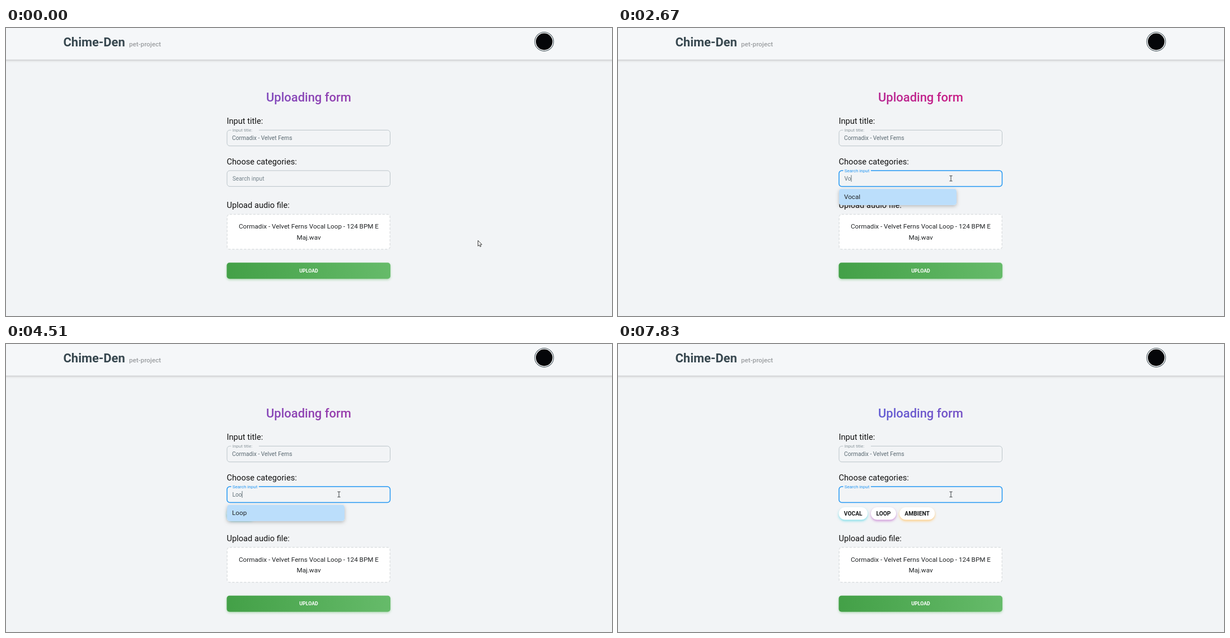
These frames come from a looping animation (1083 by 517 pixels, 8000 ms). An HTML page with a canvas:

```html
<!DOCTYPE html>
<html lang="en">
<head>
<meta charset="utf-8">
<title>Uploading form</title>
<style>
  html, body { margin: 0; width: 100%; height: 100%; overflow: hidden; background: #f2f4f6; }
  canvas { display: block; width: 1083px; height: 517px; }
</style>
</head>
<body>
<canvas id="stage"></canvas>
<script>
const W = 1083, H = 517, LOOP = 8000;
const PAGE = '#f2f4f6', BLUE = '#2196f3';
const LEFT = 394.5, WIDTH = 292.5, ROW = 29.2;
const ROOT = 0.7315; // page zoom: CSS px to stage px
const TITLE = 'Cormadix - Velvet Ferns';

const canvas = document.getElementById('stage');
const ctx = canvas.getContext('2d');
const dpr = window.devicePixelRatio || 1;
canvas.width = W * dpr;
canvas.height = H * dpr;

const CHIPS = [
  { at: 3240, label: 'VOCAL', x: 394.5, w: 51.5, glow: '#80deea' },
  { at: 4720, label: 'LOOP', x: 452, w: 45, glow: '#ce93d8' },
  { at: 7280, label: 'AMBIENT', x: 503, w: 63.2, glow: '#ffcc80' }
];

// Each entry: time, text in the search field, suggestions
const TYPING = [
  [1000, '', []],
  [1970, 'V', ['Vocal', 'Live', 'Wave', 'Reverb', 'Vibe']],
  [2380, 'Vo', ['Vocal']],
  [3240, '', []],
  [3840, 'L', ['Loop', 'Lofi', 'Melody', 'Sample', 'Chill']],
  [4040, 'Lo', ['Loop', 'Lofi']],
  [4250, 'Loo', ['Loop']],
  [4720, '', []],
  [5820, 'A', ['Ambient', 'Sample', 'Bass', 'Guitar', 'Piano']],
  [6170, 'Am', ['Ambient', 'Sample']],
  [7280, '', []]
];

const POINTER = [[70, 843.5, 381.5], [250, 812, 378], [560, 640, 308], [680, 610, 293], [810, 595, 270]];

const clamp = (v, a = 0, b = 1) => Math.min(b, Math.max(a, v));
const mix = (a, b, k) => a + (b - a) * k;
const smooth = k => k * k * (3 - 2 * k);

// CSS "ease": cubic-bezier(.25, .1, .25, 1)
function ease(x) {
  let lo = 0, hi = 1, u = 0.5;
  const bez = (a, b) => 3 * (1 - u) ** 2 * u * a + 3 * (1 - u) * u * u * b + u ** 3;
  for (let i = 0; i < 20; i++) {
    u = (lo + hi) / 2;
    if (bez(0.25, 0.25) < x) lo = u; else hi = u;
  }
  return bez(0.1, 1);
}

function text(str, x, y, px, color, weight = 400, align = 'left') {
  ctx.font = `${weight} ${px * ROOT}px Roboto, sans-serif`;
  ctx.textAlign = align;
  ctx.fillStyle = color;
  ctx.fillText(str, x, y);
  return ctx.measureText(str).width;
}

function box(x, y, w, h, r) {
  ctx.beginPath();
  ctx.roundRect(x, y, w, h, r);
}

function shadowFill(color, dy, blur, fill) {
  ctx.save();
  ctx.shadowColor = color;
  ctx.shadowOffsetY = dy * dpr;
  ctx.shadowBlur = blur * dpr;
  ctx.fillStyle = fill;
  ctx.fill();
  ctx.restore();
}

function header() {
  ctx.beginPath();
  ctx.rect(-10, -10, W + 20, 66.7);
  shadowFill('rgba(0,0,0,.22)', 1.5, 4, '#f5f7f9');
  text('Chime-Den', 102.5, 32.7, 30, '#37474f', 700);
  text('pet-project', 220, 32.7, 16, '#9b9ea1', 500);

  const disc = (r, color) => {
    ctx.beginPath();
    ctx.arc(961.8, 24.5, r, 0, 7);
    ctx.fillStyle = color;
    ctx.fill();
  };
  disc(17.4, '#37474f');
  disc(16.4, '#fff');
  disc(14.9, '#050609');
}

function heading(t) {
  const half = 4250, turn = 3190, span = 6, w = 152;
  const phase = (t - turn) / half, k = Math.floor(phase);
  const e = ease(phase - k);
  const pos = k % 2 ? e : 1 - e;
  const x0 = 464.7 - pos * (span - 1) * w;
  const g = ctx.createLinearGradient(x0, 0, x0 + span * w, 0);
  g.addColorStop(0, 'rgb(92,98,218)');
  g.addColorStop(1, 'rgb(202,28,132)');
  text('Uploading form', 540.9, 132, 30, g, 500, 'center');
}

// float: 0 = label rests inside as placeholder, 1 = label sits in the border
function field(y, label, float, focus) {
  ctx.lineWidth = mix(0.9, 1.5, focus);
  ctx.strokeStyle = focus > 0.3 ? BLUE : '#b5bfc5';
  box(LEFT + 0.5, y + 0.5, WIDTH - 1, 28.4, 5);
  ctx.stroke();
  const px = mix(14, 11, float);
  const color = focus > 0.3 ? BLUE : float ? '#8b979d' : '#73828a';
  if (float > 0.6) {
    ctx.fillStyle = PAGE;
    ctx.fillRect(402.5, y - 1, label.length * 0.7 + 41, 3.2);
  }
  text(label, 404.7, mix(y + 18, y + 3, float), px, color);
}

function search(t, state) {
  const k = smooth(clamp((t - 880) / 200));
  field(255.5, 'Search input', k, k);
  if (!state) return;
  const w = text(state[1], 404.5, 273.8, 14, '#607078');
  if (Math.floor((t - state[0]) / 545) % 2 === 0) {
    ctx.fillStyle = '#55636a';
    ctx.fillRect(404.4 + w, 264, 0.9, 12);
  }
}

function chip(c) {
  box(c.x, 293, c.w, 22.6, 11.3);
  shadowFill(c.glow, 2.2, 4, '#fff');
  text(c.label, c.x + c.w / 2, 308, 14, '#16191b', 700, 'center');
}

function upload(dy) {
  text('Upload audio file:', LEFT, 323.3 + dy, 20, '#111');
  box(LEFT + 0.7, 334.5 + dy, WIDTH - 1.4, 62.8, 4.5);
  ctx.fillStyle = '#fff';
  ctx.fill();
  ctx.setLineDash([4.2, 2.8]);
  ctx.lineWidth = 1.4;
  ctx.strokeStyle = '#dcdfe1';
  ctx.stroke();
  ctx.setLineDash([]);
  text(TITLE + ' Vocal Loop - 124 BPM E', 541, 360.3 + dy, 16, '#1f2224', 400, 'center');
  text('Maj.wav', 541, 379.8 + dy, 16, '#1f2224', 400, 'center');

  const y = 421.2 + dy;
  const g = ctx.createLinearGradient(LEFT + 132, y + 146, LEFT + 161, y - 117);
  const across = ctx.createLinearGradient(LEFT, y + 29, LEFT + WIDTH, y);
  across.addColorStop(0, '#43a047');
  across.addColorStop(1, '#66bb6a');
  box(LEFT, y, WIDTH, 29, 5);
  shadowFill('rgba(76,175,80,.4)', 1.8, 4, across);
  text('UPLOAD', 541, y + 17.6, 12, '#fff', 700, 'center');
}

function menu(items) {
  if (!items.length) return;
  const y = 288.7, h = Math.min(items.length * ROW, 140.4);
  box(395, y, 210, h, 4.5);
  shadowFill('rgba(0,0,0,.25)', 2, 6, '#fff');
  ctx.save();
  ctx.clip();
  ctx.fillStyle = '#bbdefb';
  ctx.fillRect(395, y, 210, ROW);
  items.forEach((s, i) => text(s, 404, 307.2 + i * ROW, 16, '#212426'));
  ctx.restore();
}

function pointer(t) {
  let i = 0;
  while (i < POINTER.length - 2 && t > POINTER[i + 1][0]) i++;
  const [a, ax, ay] = POINTER[i], [b, bx, by] = POINTER[i + 1];
  const k = clamp((t - a) / (b - a));
  const x = mix(ax, bx, k), y = mix(ay, by, k);
  ctx.save();
  ctx.translate(x, y);
  ctx.beginPath();
  if (y < 285) {
    ctx.moveTo(-2.6, -4.7);
    ctx.lineTo(2.6, -4.7);
    ctx.moveTo(0, -4.7);
    ctx.lineTo(0, 4.7);
    ctx.moveTo(-2.6, 4.7);
    ctx.lineTo(2.6, 4.7);
    ctx.lineWidth = 1;
    ctx.strokeStyle = '#3c4043';
  } else {
    [[0, 0], [0, 10], [2.3, 8], [3.8, 11.2], [5.4, 10.5], [4, 7.4], [7, 7.2]]
      .forEach(p => ctx.lineTo(...p));
    ctx.closePath();
    ctx.fillStyle = '#fff';
    ctx.fill();
    ctx.lineWidth = 0.9;
    ctx.strokeStyle = '#222';
  }
  ctx.stroke();
  ctx.restore();
}

function draw(t) {
  ctx.setTransform(dpr, 0, 0, dpr, 0, 0);
  ctx.fillStyle = PAGE;
  ctx.fillRect(0, 0, W, H);
  const state = TYPING.filter(s => s[0] <= t).pop();
  const chips = CHIPS.filter(c => c.at <= t);

  header();
  heading(t);
  text('Input title:', LEFT, 172, 20, '#111');
  field(182.8, 'Input title:', 1, 0);
  text(TITLE, 404, 201.2, 14, '#5b6a72');
  text('Choose categories:', LEFT, 245, 20, '#111');
  search(t, state);
  upload(chips.length ? 30.5 : 0);
  chips.forEach(chip);
  if (state) menu(state[2]);
  pointer(t);
}

const start = performance.now();
function frame() {
  draw((performance.now() - start) % LOOP);
  requestAnimationFrame(frame);
}
frame();
</script>
</body>
</html>
```
